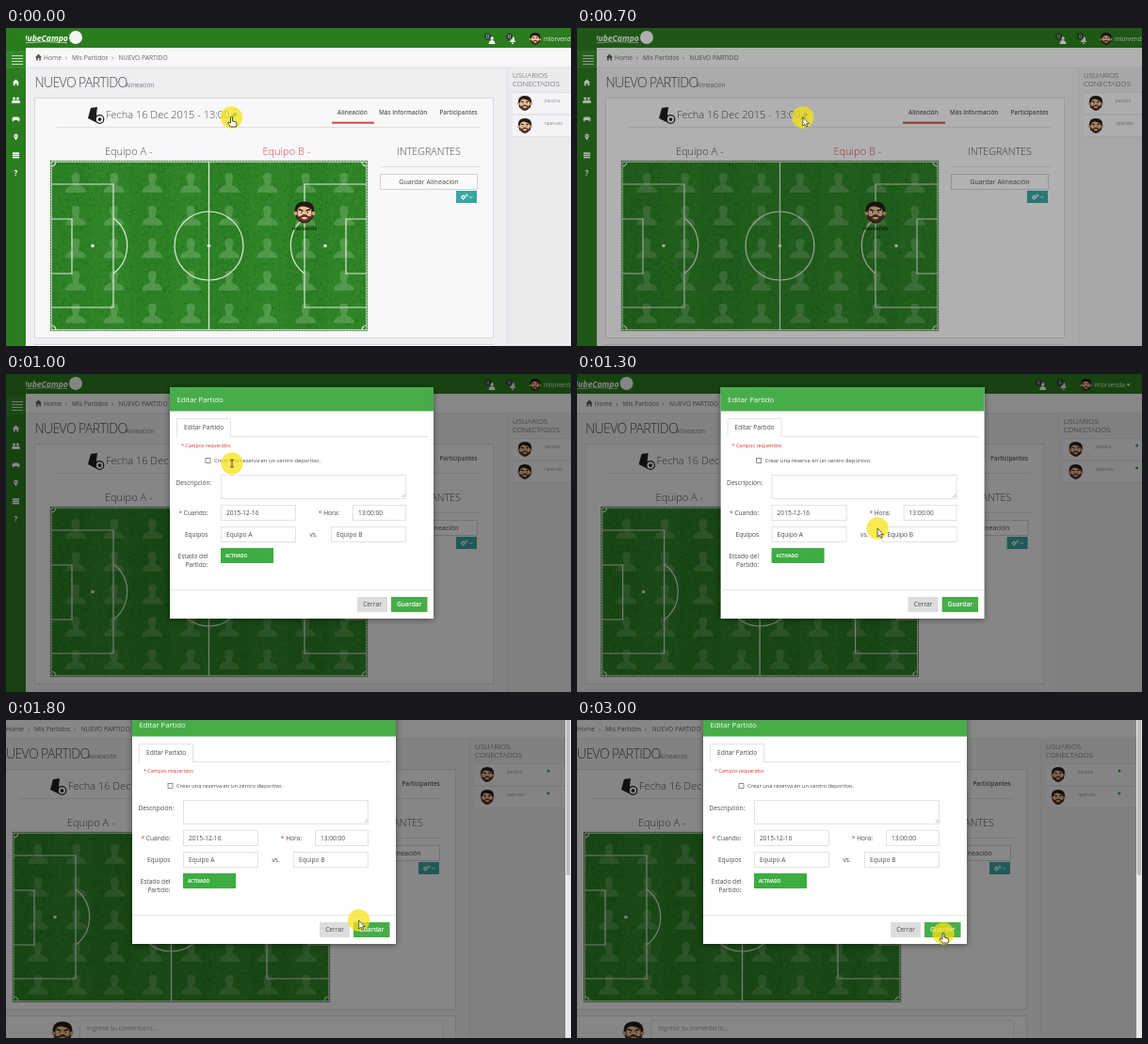
Recreate the animation shown at these times as an HTML page. Size 600 px wide and 338 px high, loop 3100 ms.

```html
<!DOCTYPE html>
<html lang="es">
<head>
<meta charset="utf-8">
<title>Editar partido</title>
<style>
  html, body { margin: 0; width: 100%; height: 100%; overflow: hidden; background: #efeff1; }
  svg { display: block; width: 100vw; height: 100vh; font-family: "Open Sans", "Noto Sans", sans-serif; }
  text { white-space: pre; }
</style>
</head>
<body>
<svg id="stage" viewBox="0 0 600 338" preserveAspectRatio="none"></svg>
<script>
const LOOP = 3100, STEP = 100;
const GREEN = '#2b7b1f', LIME = '#47ad49', INK = '#4a4a4d', RED = '#d24748';

const rect = (x, y, w, h, fill, extra = '') =>
  `<rect x="${x}" y="${y}" width="${w}" height="${h}" fill="${fill}" ${extra}/>`;
const box = (x, y, w, h, fill = '#fff', stroke = '#dcdcdc') =>
  rect(x + .5, y + .5, w - 1, h - 1, fill, `stroke="${stroke}" stroke-width=".8"`);
const circle = (x, y, r, fill, extra = '') =>
  `<circle cx="${x}" cy="${y}" r="${r}" fill="${fill}" ${extra}/>`;
const path = (d, fill, extra = '') => `<path d="${d}" fill="${fill}" ${extra}/>`;
const line = (d, stroke, width = 1) => path(d, 'none', `stroke="${stroke}" stroke-width="${width}"`);
const text = (x, y, size, str, fill = INK, extra = '') =>
  `<text x="${x}" y="${y}" font-size="${size}" fill="${fill}" ${extra}>${str}</text>`;
const at = (x, y, body, scale = 1) => `<g transform="translate(${x} ${y}) scale(${scale})">${body}</g>`;
const LIGHT = 'font-weight="300"', SEMI = 'font-weight="600"', END = 'text-anchor="end"', MID = 'text-anchor="middle"';

function seeded(seed) {
  return () => (seed = (seed * 16807) % 2147483647) / 2147483647;
}

// Bearded face, about 20 px wide at scale 1
const face = (x, y, scale) => at(x, y,
  path('M-10-1Q-10-11 0-11T10-1L8 6Q4 11 0 11T-8 6Z', '#241a14') +
  circle(-9, 1, 2, '#dca06f') + circle(9, 1, 2, '#dca06f') +
  path('M-7-3Q-5-7 0-6T7-3L7 4Q4 9 0 9T-7 4Z', '#efbd8d') +
  path('M-7 3Q-4 5-3 3Q0 1 3 3Q4 5 7 3L6 7Q3 10 0 10T-6 7Z', '#5a3323') +
  path('M-3 5Q0 4 3 5L2 7H-2Z', '#f3c9a4') +
  line('M-6-3L-1.5-1.5M6-3L1.5-1.5', '#201510', 1.5) +
  circle(-3.5, 0, 1.5, '#fff') + circle(3.5, 0, 1.5, '#fff') +
  circle(-3.2, .2, .8, '#222') + circle(3.2, .2, .8, '#222'), scale);

const person = (x, y, s = 1) => at(x, y,
  circle(0, -2, 1.8, '#fff') + path('M-3.5 4Q-3 0 0 0T3.5 4Z', '#fff'), s);

function sidebar() {
  const pad = path('M-4 0Q-4-2.5-2-2.5H2Q4-2.5 4 0L3.5 2.5L1.5 1H-1.5L-3.5 2.5Z', '#fff');
  const home = path('M-4 0L0-4L4 0H3V3.5H1V1H-1V3.5H-3V0Z', '#fff');
  const pin = path('M0 4L-2.3 0Q-3-4 0-4T2.3 0Z', '#fff') + circle(0, -1.4, 1, GREEN);
  const rows = [-3, -.5, 2].map(y => rect(-4, y, 8, 1.8, '#fff')).join('');
  return rect(0, 0, 21, 360, GREEN) + rect(0, 24, 21, 19, '#358529') +
    line('M6 29.5H18M6 32.5H18M6 35.5H18M6 38.5H18', '#dbead8', .9) +
    at(10.5, 58, home, .9) + person(8.6, 76.5, .8) + person(12.4, 76.5, .8) +
    at(10.5, 97, pad) + at(10.5, 116, pin, .85) + at(10.5, 135, rows, .9) +
    text(10.5, 157, 8, '?', '#fff', MID + ' font-weight="700"');
}

function navbar() {
  const bell = path('M-3.5 2Q-2 1-2-1Q-2-4 0-4T2-1Q2 1 3.5 2ZM-1 2.6H1V4H-1Z', '#dfeadd');
  const badge = x => circle(x, 9, 3.6, '#2d4130') + text(x, 11, 5.4, '0', '#fff', MID);
  return rect(0, 0, 640, 21, GREEN) +
    text(16, 13.5, 8.6, 'NubeCampo', '#fff', 'font-weight="700" font-style="italic"') +
    line('M17 16Q40 13.5 65 15.5', '#d6e6d3', .8) + circle(74, 10, 7, '#f4f6f3') +
    person(516, 13) + badge(511.5) + at(538, 13, bell) + badge(534.5) +
    face(562, 11.5, .58) + text(571, 14, 6.4, 'mlorvenda', '#e9f1e7') +
    path('M605 10.5H609L607 13Z', '#fff');
}

function field() {
  const rnd = seeded(4711);
  const blades = n => {
    let d = '';
    for (let i = 0; i < n; i++)
      d += `M${(48 + rnd() * 334).toFixed(1)} ${(142 + rnd() * 178).toFixed(1)}l${(rnd() * 2 - 1).toFixed(1)} 1.6`;
    return d;
  };
  let out = rect(47, 141, 337, 181, '#2f8428');
  for (let i = 0; i < 8; i += 2) out += rect(47 + i * 42.1, 141, 42.1, 181, '#176514', 'opacity=".13"');
  out += `<g opacity=".5">${line(blades(3000), '#14590f', .8)}${line(blades(2200), '#4aa43e', .7)}</g>`;
  for (let r = 0; r < 5; r++)
    for (let c = 0; c < 8; c++)
      out += at(74 + c * 40.7, 163 + r * 34.7,
        path('M-11 12Q-11 6-3 4V2Q-7-9 0-9T3 2V4Q11 6 11 12Z', '#b4d8ad', 'opacity=".27"'));
  const half = 'M48 166H114V297H48M48 203H70V261H48M114 202A37 37 0 0 1 114 261M48 147A5 5 0 0 0 53 142M48 316A5 5 0 0 1 53 321';
  const marks = line(half, '#dcebd8', 1.2) + circle(92, 231.5, 1.8, '#e4f0e1');
  return out + line('M48 142H383V321H48ZM215.5 142V321', '#dcebd8', 1.3) +
    circle(215.5, 231.5, 36.5, 'none', 'stroke="#dcebd8" stroke-width="1.2"') +
    circle(215.5, 231.5, 1.8, '#e4f0e1') + marks +
    `<g transform="translate(431 0) scale(-1 1)">${marks}</g>` +
    rect(47.3, 141.3, 336.4, 180.4, 'none', 'stroke="#256a20" stroke-width=".8" stroke-dasharray="2 1"') +
    face(317, 196, 1.05) + text(317, 215, 5, 'mlorvenda', '#15200f', MID + SEMI.replace('font', ' font'));
}

function content() {
  const tab = (x, str) => text(x, 92.3, 6.3, str, '#59595c', SEMI);
  const user = (y, name) => face(551, y, .72) + text(572, y - 1, 4.6, name, '#8b8b90') + circle(616, y - 4, 1.5, '#3c9b3c');
  const gear = circle(0, 0, 1.9, 'none', 'stroke="#fff" stroke-width="1.5"') +
    line('M-3.2 0H-2M2 0H3.2M0-3.2V-2M0 2V3.2', '#fff', 1.3);
  return rect(21, 0, 619, 360, '#efeff2') +
    rect(21, 21, 619, 21, '#f8f8f9') + line('M21 42H640', '#dedee0') +
    path('M31 31L34.5 27.5L38 31H37V34.5H35.3V32H33.7V34.5H32V31Z', '#5b5b5f') +
    text(40, 33.7, 6.7, 'Home', '#66666a') + text(63, 33.7, 6.7, '›', '#66666a') +
    text(70, 33.7, 6.7, 'Mis Partidos', '#66666a') + text(112, 33.7, 6.7, '›', '#66666a') +
    text(119.5, 33.7, 6.7, 'NUEVO PARTIDO', '#66666a') +
    text(30.5, 63, 14, 'NUEVO PARTIDO', INK, LIGHT + ' letter-spacing="-.6"') +
    text(127, 63, 6.3, 'Alineación', '#77777b') +
    box(30, 74, 488, 256, '#f8f7f9', '#d3d3d6') + box(30, 336, 488, 30, '#f8f7f9', '#d3d3d6') +
    path('M90 85L97 84L96 92L100 99Q98 102 95 100L87 96Z', '#1d1d1f') +
    circle(99.5, 97, 4.3, '#fff', 'stroke="#1d1d1f" stroke-width="1.2"') +
    path('M99.5 95L101.5 96.5L100.7 98.8H98.3L97.5 96.5Z', '#1d1d1f') +
    text(106, 96.4, 11, 'Fecha 16 Dec 2015 - 13:00', INK, LIGHT) +
    path('M237.5 97.5L238.3 94.5L243 89.5L245.5 91.8L240.6 96.8Z', '#31877d') +
    line('M54 105.5H503', '#dfdfe2') + tab(352, 'Alineación') + tab(396, 'Más Información') +
    tab(460.5, 'Participantes') + rect(346, 99.7, 45, 2, RED) +
    text(105, 134.7, 11, 'Equipo A -', INK, LIGHT) + text(272.5, 134.7, 11, 'Equipo B -', RED, LIGHT) +
    text(449, 134.5, 10.7, 'INTEGRANTES', INK, LIGHT + ' ' + MID) + line('M397 147.5H503', '#dfdfe2') +
    field() + box(397, 155, 104, 17, '#fbfbfb', '#c6c6ca') +
    text(449, 166, 7.1, 'Guardar Alineación', INK, MID) +
    rect(478, 173, 22, 13, '#39a6a2') + at(485.5, 180, gear, .8) + at(489, 178, gear, .5) +
    line('M492.2 179L493.8 180.6L495.4 179', '#fff', .9) +
    face(100, 354, 1.05) + box(118, 341, 386, 26, '#fbfbfc') +
    text(126, 352, 6.7, 'Ingrese su comentario...', '#939398') +
    rect(532, 42, 108, 318, '#ebebee') + line('M532 42V360', '#dedee1', .8) +
    text(538, 53, 7.9, 'USUARIOS', INK, LIGHT) + text(538, 61.6, 7.9, 'CONECTADOS', INK, LIGHT) +
    rect(538, 69, 97, 22, '#f4f4f6') + rect(538, 93, 97, 22, '#f4f4f6') +
    line('M538 68.5H635M538 92H635M538 115.5H635', '#dfdfe2', .8) +
    user(80, 'jtavolca') + user(104, 'nperuvio');
}

function dialog() {
  const label = (x, y, str, required) =>
    text(x, y, 6.6, (required ? `<tspan fill="${RED}">* </tspan>` : '') + str, INK, END);
  const input = (x, y, w, str) => box(x, y, w, 17) + text(x + 6, y + 10.7, 6.6, str);
  return rect(174, 14, 280, 247, '#000', 'opacity=".45" filter="url(#blur)"') +
    rect(174, 14, 280, 246, '#fff') + rect(174, 14, 280, 25.5, LIME) +
    text(181.5, 29.6, 7.7, 'Editar Partido', '#fff') +
    line('M181 66.5H448', '#dcdcdc', .8) + path('M181.5 67V47.5H238.5V67', '#fff', 'stroke="#dcdcdc" stroke-width=".8"') +
    text(189, 59.3, 6.6, 'Editar Partido') + text(186, 78, 5.3, '* Campos requeridos', '#d73234') +
    box(211.5, 89, 6, 6, '#fbfbfb', '#77777a') +
    text(221, 94.2, 5.8, 'Crear una reserva en un centro deportivo.') +
    text(180.5, 117.6, 6.6, 'Descripción:') + box(228, 107, 197, 26) +
    line('M420.5 131L424 127.5M422.5 131L424 129.5', '#999', .6) +
    label(214.5, 150, 'Cuando:', true) + input(228, 139, 80, '2015-12-16') +
    label(354, 150, 'Hora:', true) + input(368, 139, 57, '13:00:00') +
    label(214.5, 173, 'Equipos') + input(228, 162, 80, 'Equipo A') +
    text(322.5, 173, 6.6, 'vs.') + input(345, 162, 80, 'Equipo B') +
    label(214.5, 195.7, 'Estado del') + label(214.5, 205.2, 'Partido:') +
    rect(228, 185, 56, 16, '#3dac42') + text(233, 195.3, 4.6, 'ACTIVADO', '#fff', 'font-weight="700"') +
    line('M174 229.5H454', '#e2e2e2', .8) +
    rect(373, 237, 32, 16, '#dddddf') + text(389, 247.4, 6.7, 'Cerrar', INK, MID) +
    rect(409, 237, 38.5, 16, LIME) + text(428.3, 247.4, 6.7, 'Guardar', '#fff', MID + ' font-weight="600"');
}

const pointers = {
  hand: path('M-1 0Q0-1 1 0V4L5 5Q6 6 5 10H-1L-4 6Q-4 4-1 6Z', '#fff', 'stroke="#222" stroke-width=".8"'),
  arrow: path('M0 0V9L2.1 7.2L3.5 10.3L5 9.6L3.6 6.6H6.4Z', '#fff', 'stroke="#222" stroke-width=".7"'),
  beam: line('M-2-4Q0-4 0-3V3Q0 4-2 4M2-4Q0-4 0-3M0 3Q0 4 2 4', '#222', .8)
};

const stage = document.getElementById('stage');
stage.innerHTML =
  `<defs><filter id="blur" x="-20%" y="-20%" width="140%" height="140%"><feGaussianBlur stdDeviation="3"/></filter></defs>
  <g id="world">${content()}${navbar()}${sidebar()}
    <rect id="shade" width="640" height="360"/>
    <g id="dialog">${dialog()}</g>
    ${rect(634, 0, 6, 360, '#e9e9ea')}${rect(635, 0, 4, 187, '#bdbdbf')}
    <g id="cursor">${circle(0, 0, 11.7, '#f6e216', 'opacity=".74"')}
      ${Object.entries(pointers).map(([k, body]) => `<g id="${k}">${body}</g>`).join('')}</g>
  </g>`;
const $ = id => document.getElementById(id);

// Keys are [time, value, value, ...], joined by straight lines
function track(keys, t) {
  const i = keys.findIndex(k => k[0] > t);
  if (i < 0) return keys.at(-1).slice(1);
  if (i === 0) return keys[0].slice(1);
  const a = keys[i - 1], b = keys[i], f = (t - a[0]) / (b[0] - a[0]);
  return a.slice(1).map((v, n) => v + (b[n + 1] - v) * f);
}

const PAN = [[1000, 0, 0], [1300, -21.4, 0], [1600, -40, -11], [1800, -40, -22]];
const MOUSE = [[0, 239.5, 95], [1000, 240, 95], [1300, 340.5, 164], [1800, 414.7, 235], [2000, 426, 246], [2200, 429, 249]];
const SHADE = [[600, 0], [700, .29], [800, .46]];
const DIALOG = [[700, 0, -40], [800, .45, -22], [900, .9, -5], [1000, 1, 0]];
const TIPS = [[0, 'hand'], [600, 'arrow'], [1000, 'beam'], [1100, 'arrow'], [1900, 'hand']];

function draw(ms) {
  const t = Math.floor((ms % LOOP) / STEP) * STEP;
  const [opacity, drop] = track(DIALOG, t);
  $('world').setAttribute('transform', `translate(${track(PAN, t)})`);
  $('cursor').setAttribute('transform', `translate(${track(MOUSE, t)})`);
  $('shade').setAttribute('opacity', track(SHADE, t)[0]);
  $('dialog').setAttribute('opacity', opacity);
  $('dialog').setAttribute('transform', `translate(0 ${drop})`);
  const tip = TIPS.filter(k => k[0] <= t).at(-1)[1];
  for (const k in pointers) $(k).setAttribute('display', k === tip ? 'inline' : 'none');
}

const start = performance.now();
function tick() {
  draw(performance.now() - start);
  requestAnimationFrame(tick);
}
tick();
</script>
</body>
</html>
```
